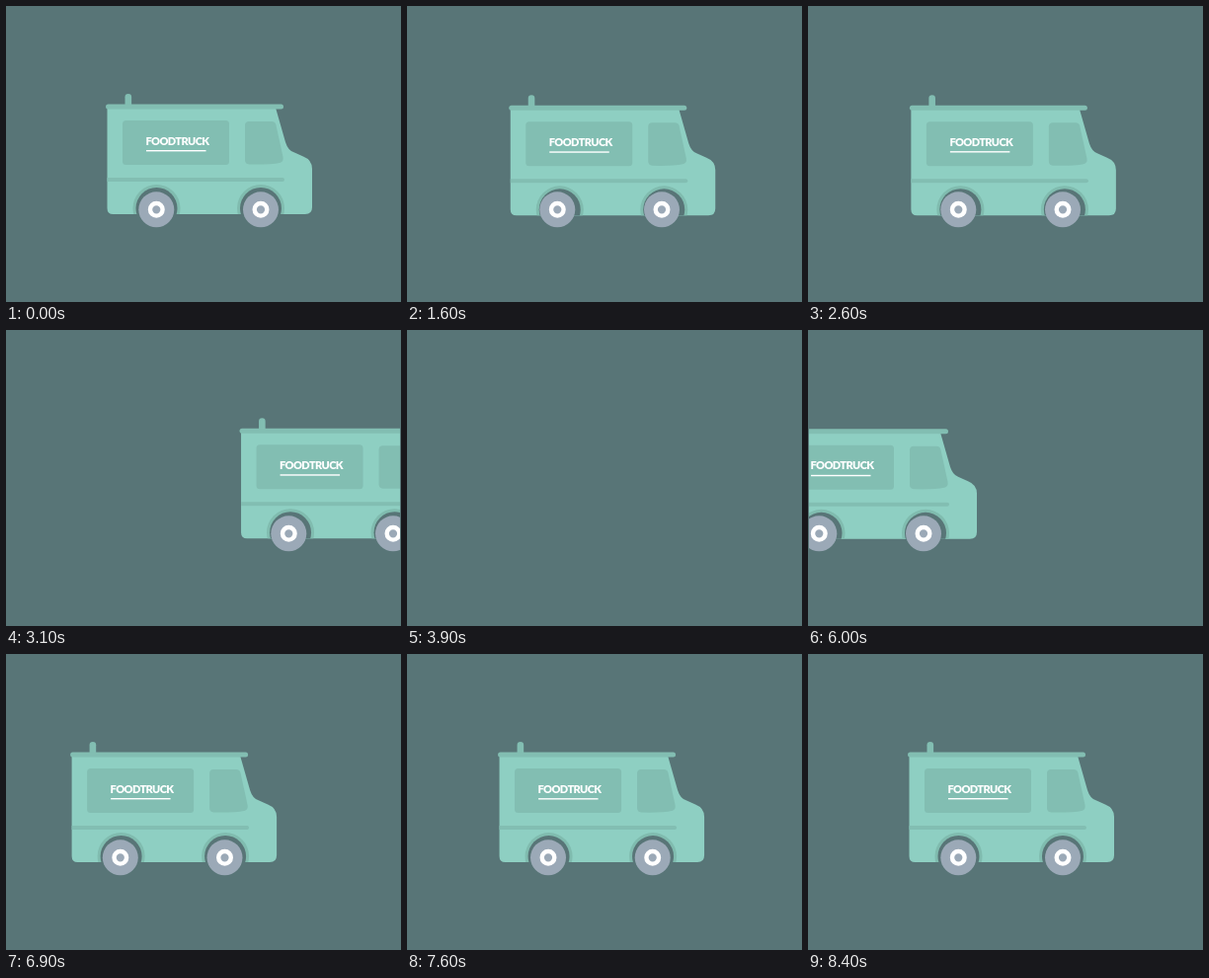
Write an HTML page that moves like this. It is 400 px wide and 300 px high and loops after 8500 ms.

```html
<!DOCTYPE html>
<html lang="en">
<head>
<meta charset="utf-8">
<title>Food truck</title>
<style>
  html, body { margin: 0; width: 100%; height: 100%; overflow: hidden; background: #587577; }
  svg { display: block; width: 100vw; height: 100vh; }
  .sign { font: 900 11px Lato, sans-serif; letter-spacing: -.6px; fill: #fff; }
</style>
</head>
<body>
<svg viewBox="0 0 400 300">
  <defs>
    <clipPath id="stage"><rect x="1" width="398" height="300"/></clipPath>
    <clipPath id="aboveSill"><rect x="90" y="80" width="240" height="131"/></clipPath>
    <g id="arch">
      <circle r="24" fill="#80bcaf"/>
      <circle r="21" fill="#587577"/>
    </g>
    <g id="wheel">
      <circle r="18" fill="#9ba9b7"/>
      <circle r="6.3" fill="none" stroke="#fff" stroke-width="4.4"/>
    </g>
  </defs>
  <g clip-path="url(#stage)">
    <g id="truck">
      <g id="body">
        <path fill="#8ecfc2" d="M102.5 103H273L283 138Q285.5 146 291 148L301 152.5Q310 156 310 165V204Q310 211 303 211H108.5Q102.5 211 102.5 205Z"/>
        <g fill="#82beb2">
          <path d="M120.5 101V92.3a3.3 3.3 0 0 1 6.6 0V101Z"/>
          <rect x="101" y="99.5" width="180" height="5" rx="2.5"/>
          <rect x="118" y="116" width="108" height="45" rx="3.5"/>
          <path d="M246 117H269Q272.500 117 273.300 120L280.500 153Q281.500 158 277 159Q268 161 246 160.500Q242 160 242 156V121Q242 117 246 117Z"/>
          <path d="M102.500 174H280a2 2 0 0 1 0 4H102.500Z"/>
        </g>
        <text class="sign" x="141.500" y="140.500">FOODTRUCK</text>
        <rect x="142" y="146" width="60.500" height="1.400" fill="#fff"/>
        <g clip-path="url(#aboveSill)">
          <use href="#arch" x="152.500" y="205"/>
          <use href="#arch" x="258" y="205"/>
        </g>
      </g>
      <use href="#wheel" x="152.300" y="206.300"/>
      <use href="#wheel" x="258" y="206.300"/>
    </g>
  </g>
</svg>
<script>
const LOOP = 8500, STEP = 100, BOB = 600;
const truck = document.getElementById('truck');
const body = document.getElementById('body');

// Tracks are [time, value] pairs.
const leave = [[2700, 0], [2900, 44], [3100, 134], [3300, 196], [3600, 267], [3900, 301]];
const enter = [[5500, -320], [6000, -141], [6400, -77], [6900, -36.5], [7300, -18], [7800, -5], [8200, -0.6], [8400, 0]];
const sway = [[0, 1], [900, 1], [1100, 3], [2500, 3], [2700, 2], [3900, 1.4], [7000, 1.4], [8400, 0]];
const lean = [[2700, 0], [3100, 1.1], [3900, 0.6], [7000, 0.6], [7800, 0]];

function sample(track, t, smooth) {
  const last = track.length - 1;
  if (t <= track[0][0]) return track[0][1];
  if (t >= track[last][0]) return track[last][1];
  const i = track.findIndex(p => p[0] > t) - 1;
  const [t0, a] = track[i], [t1, b] = track[i + 1];
  const span = t1 - t0, u = (t - t0) / span;
  if (!smooth) return a + (b - a) * u;
  const slope = k => {
    const p = track[Math.max(k - 1, 0)], q = track[Math.min(k + 1, last)];
    return (q[1] - p[1]) / (q[0] - p[0]) * span;
  };
  const m0 = t0 === 2700 ? 0 : slope(i);
  const m1 = t1 === 8400 ? 0 : slope(i + 1);
  const v = 1 - u;
  return a * v * v * (1 + 2 * u) + m0 * u * v * v + b * u * u * (3 - 2 * u) - m1 * u * u * v;
}

function draw(time) {
  const t = Math.floor(time % LOOP / STEP) * STEP;
  const away = t >= 3900 && t < 5600;
  truck.style.display = away ? 'none' : '';
  if (away) return;
  const arriving = t >= 5600;
  const x = sample(arriving ? enter : leave, t, true);
  const phase = (t + (arriving ? BOB / 2 : 0)) / BOB;
  const bob = sample(sway, t) * (0.5 - 0.5 * Math.cos(2 * Math.PI * phase));
  truck.setAttribute('transform', `translate(${x} 0)`);
  body.setAttribute('transform', `translate(${bob + sample(lean, t)} ${bob * 0.6})`);
}

const start = performance.now();
function tick() {
  draw(performance.now() - start);
  requestAnimationFrame(tick);
}
tick();
</script>
</body>
</html>
```
